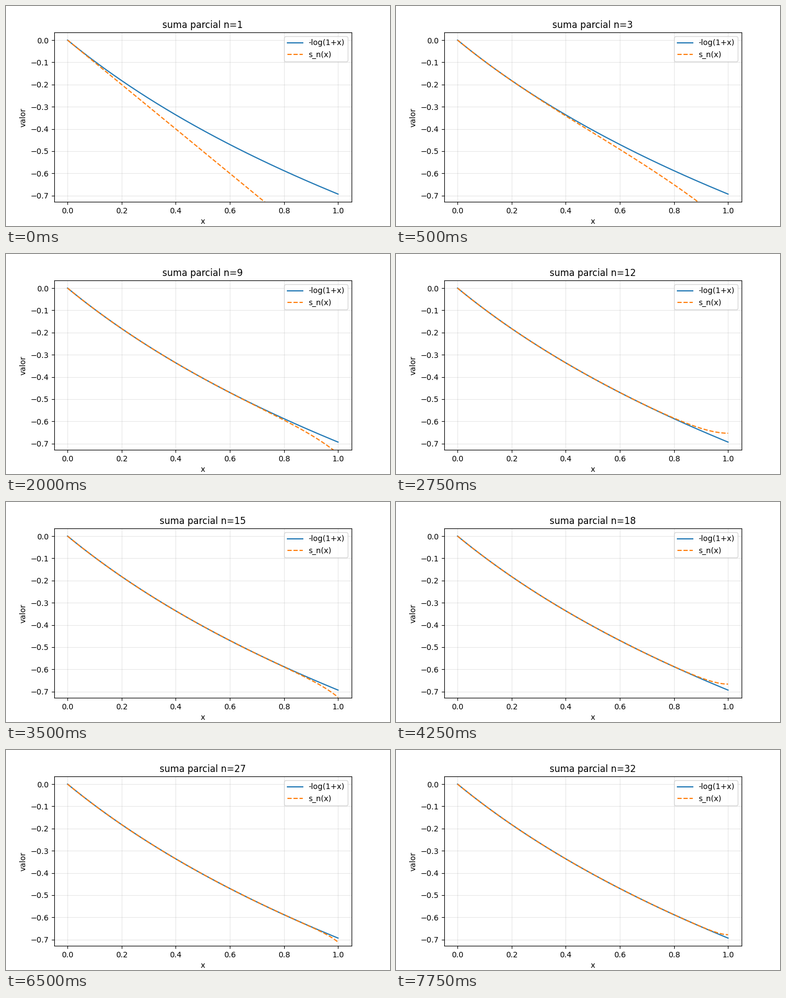
Animation of 700 by 400 pixels, one loop 8 s. Source, as a matplotlib script:

```python
import numpy as np
import matplotlib.pyplot as plt
from matplotlib.animation import FuncAnimation

TERMS = 32
STEP_MS = 250

x = np.linspace(0, 1, 400)


def partial_sum(n):
    """First n terms of the power series of -log(1+x)."""
    return sum((-x) ** k / k for k in range(1, n + 1))


fig, ax = plt.subplots(figsize=(7, 4), dpi=100)
ax.plot(x, -np.log1p(x), label="-log(1+x)")
# Fix the limits so the partial sums are clipped by the axes.
ax.set_xlim(ax.get_xlim())
ax.set_ylim(ax.get_ylim())
approx, = ax.plot(x, partial_sum(1), "--", label="s_n(x)")
ax.set_xlabel("x")
ax.set_ylabel("valor")
ax.grid(alpha=0.3)
ax.legend(loc="upper right")
title = ax.set_title("suma parcial n=1")


def update(i):
    n = i + 1
    approx.set_ydata(partial_sum(n))
    title.set_text(f"suma parcial n={n}")
    return approx, title


anim = FuncAnimation(fig, update, frames=TERMS, interval=STEP_MS,
                     repeat=True, repeat_delay=0, blit=False)
plt.show()
```
